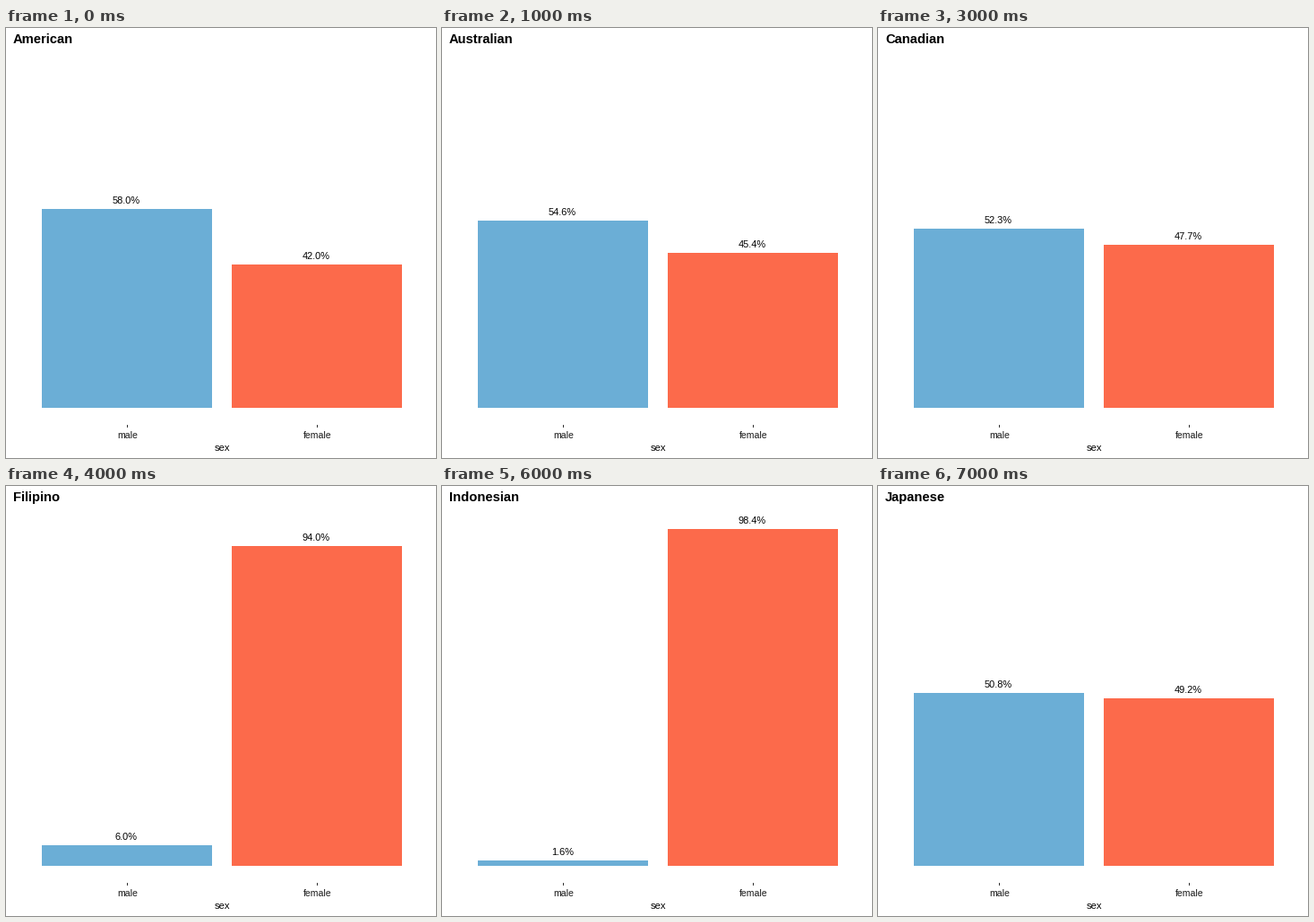
Recreate the animation shown at these times as a matplotlib script. Size 480x480 px, loop 8 s.

```python
import matplotlib.pyplot as plt
from matplotlib.animation import FuncAnimation
from matplotlib.patches import Rectangle

SIZE, DPI = 480, 100
BASE = 424
BAR_W = 190
BLUE, RED = "#6BAED6", "#FC6A4B"

# title, male share in percent, top of the male bar, top of the female bar
GROUPS = [
    ("American", 58.0, 202, 264),
    ("Australian", 54.6, 215, 251),
    ("British", 62.1, 187, 279),
    ("Canadian", 52.3, 224, 242),
    ("Filipino", 6.0, 401, 67),
    ("Indian", 47.9, 241, 225),
    ("Indonesian", 1.6, 418, 48),
    ("Japanese", 50.8, 231, 237),
]

plt.rcParams["font.family"] = "Liberation Sans"
fig = plt.figure(figsize=(SIZE / DPI, SIZE / DPI), dpi=DPI, facecolor="white")
ax = fig.add_axes([0, 0, 1, 1])
ax.set_xlim(0, SIZE)
ax.set_ylim(SIZE, 0)
ax.axis("off")


def text(x, y, s="", px=11, ha="center", **kw):
    return ax.text(x, y, s, fontsize=px * 72 / DPI, ha=ha, va="baseline", **kw)


def rect(x, y, w, h, color):
    return ax.add_patch(Rectangle((x, y), w, h, fc=color, lw=0, antialiased=False))


title = text(8, 17, px=14.7, ha="left", weight="bold")
text(241, 472, "sex", 11.3)

bars, labels = [], []
for left, name, color in ((40, "male", BLUE), (252, "female", RED)):
    mid = left + BAR_W / 2
    bars.append(rect(left, BASE, BAR_W, 0, color))
    labels.append(text(mid - 0.5, BASE))
    rect(mid, 443, 1, 3, "#333333")
    text(mid + 0.3, 458, name, 10.5, color="#1a1a1a")


def draw(i):
    name, male, *tops = GROUPS[i]
    title.set_text(name)
    for bar, label, share, top in zip(bars, labels, (male, 100 - male), tops):
        bar.set_y(top)
        bar.set_height(BASE - top)
        label.set_text(f"{share:.1f}%")
        label.set_y(top - 6)
    return [title, *bars, *labels]


anim = FuncAnimation(fig, draw, frames=len(GROUPS), interval=1000,
                     repeat=True, repeat_delay=0)
plt.show()
```
